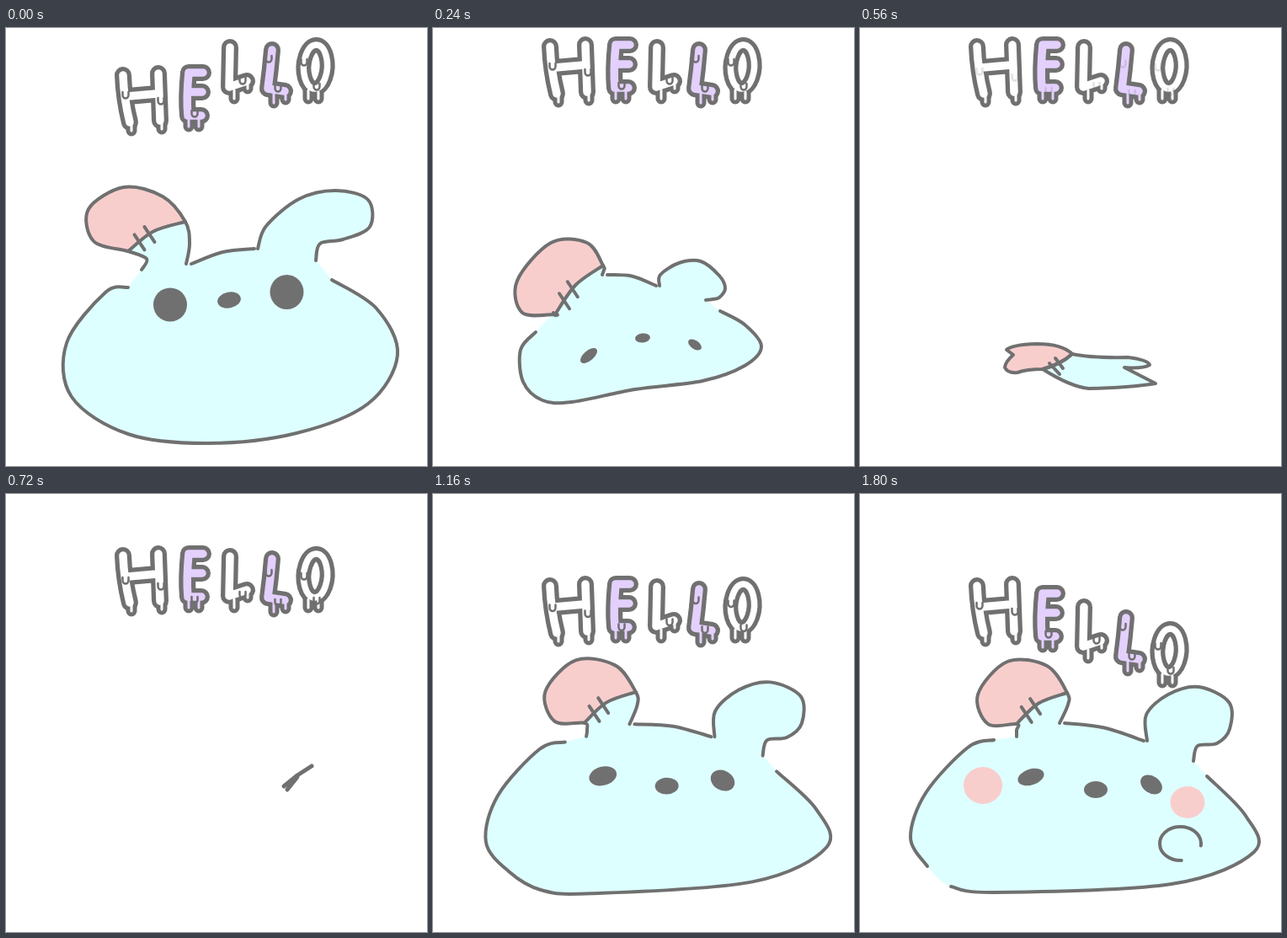
Animation of 500x520 px, one loop 1.84 s. Source, as an HTML page with a canvas:

```html
<!DOCTYPE html>
<html>
<head>
<meta charset="utf-8">
<style>
html, body { margin: 0; width: 100%; height: 100%; overflow: hidden; background: #fff; }
canvas { display: block; }
</style>
</head>
<body>
<canvas id="stage" width="500" height="520"></canvas>
<script>
const ctx = document.getElementById('stage').getContext('2d');
const LOOP = 1840, STEP = 40;
const GRAY = '#707070', BLUE = '#deffff', PINK = '#f8cecd', VIOLET = '#e4d0fd';

const lerp = (a, b, u) => a + (b - a) * u;
const ease = u => u * u * (3 - 2 * u);

// Value at time t between [time, value] keys.
function key(t, ...keys) {
  let [t0, v0] = keys[0];
  for (const [t1, v1] of keys) {
    if (t < t1) return t1 === t0 ? v1 : lerp(v0, v1, (t - t0) / (t1 - t0));
    [t0, v0] = [t1, v1];
  }
  return v0;
}

// Key points of a pose; all poses have the same layout, so they can be blended.
// The features are ellipses: x, y, radii, turn.
const points = text => text.split(' ').map(s => s.split(',').map(Number));
const pose = (body, right, left, features) =>
  ({ body: points(body), right: points(right), left: points(left), features: points(features) });

const greet = pose(
  '145,308 118,314 72,374 78,438 145,482 240,493 345,481 430,446 465,388 440,333 387,299',
  '299,262 309,235 348,203 392,193 430,204 432,236 400,251 373,256 368,276',
  '214,280 218,256 213,230 186,200 140,189 98,215 104,253 145,265 167,274 161,287',
  '195,328.5,20,20,0 333.5,313.5,20,20.5,0 265,323,14,9.5,-.2');
const slump = pose(
  '122,361 104,382 107,420 130,442 165,444 240,429 320,419 370,401 390,378 370,352 341,336',
  '269,306 270,293 292,279 318,277 340,294 347,309 340,320 332,322 324,323',
  '201,293 203,287 202,282 183,255 140,255 100,300 106,338 145,340 145,341 143,338',
  '185,389,12,6,-.7 311,376,9,5,.6 249,368,9,5.5,-.1');
const pop = pose(
  '140,299 104,330 74,388 82,445 125,476 210,486 300,479 400,463 444,415 436,350 392,306',
  '293,263 303,223 334,190 372,181 415,194 426,220 400,244 371,252 369,274',
  '218,256 220,248 218,240 205,214 165,209 128,233 135,261 174,275 175,283 166,290',
  '202,308,16,15.5,0 330,305,14,16,0 262,307,12,9,-.2');
const rest = pose(
  '159,292 128,301 78,355 60,408 80,442 108,466 160,473 370,463 468,425 458,382 412,335',
  '341,293 340,262 366,238 402,229 438,247 439,279 424,296 401,299 396,317',
  '237,272 247,250 246,236 222,204 175,199 140,238 152,273 186,273 186,280 186,288',
  '203,336,16,9.5,-.3 346,345,14,10,.6 280,351,14,10,0');

function blend(a, b, u) {
  const p = {};
  for (const part in a)
    p[part] = a[part].map((nums, i) => nums.map((v, j) => lerp(v, b[part][i][j], u)));
  return p;
}

// Smooth curves through runs of points, joined by straight lines.
function curve(...runs) {
  const path = new Path2D();
  for (const pts of runs) {
    const at = i => pts[Math.max(0, Math.min(pts.length - 1, i))];
    path.lineTo(...pts[0]);
    for (let i = 0; i < pts.length - 1; i++) {
      const a = at(i - 1), b = at(i), c = at(i + 1), d = at(i + 2);
      path.bezierCurveTo(b[0] + (c[0] - a[0]) / 6, b[1] + (c[1] - a[1]) / 6,
        c[0] - (d[0] - b[0]) / 6, c[1] - (d[1] - b[1]) / 6, ...c);
    }
  }
  return path;
}

// Three points: from a to b with the middle pushed by (dx, dy).
const bow = (a, b, dx, dy) => [a, [(a[0] + b[0]) / 2 + dx, (a[1] + b[1]) / 2 + dy], b];
const back = pts => [...pts].reverse();

function fill(path, color) {
  ctx.fillStyle = color;
  ctx.fill(path);
}
function stroke(path, width = 4, color = GRAY) {
  ctx.lineWidth = width;
  ctx.strokeStyle = color;
  ctx.stroke(path);
}
function oval(x, y, rx, ry, turn, color) {
  const path = new Path2D();
  path.ellipse(x, y, rx, ry, turn, 0, 2 * Math.PI);
  fill(path, color);
}

function bunny({ body, right, left, features }, gap) {
  const head = bow([left[0][0] + 6, left[0][1]], [right[0][0] - 4, right[0][1]], 0, -5);
  const patch = left.slice(2, 8);
  const seam = bow(patch[5], patch[0], -4, -6);
  fill(curve(body, back(right), back(head), left), BLUE);
  fill(curve(patch, seam), PINK);

  const outline = gap ? [body.slice(0, 5), body.slice(5)] : [body];
  for (const line of [...outline, head, right, left, seam]) stroke(curve(line));
  for (const u of [0.45, 0.85]) {
    const x = lerp(seam[0][0], seam[1][0], u), y = lerp(seam[0][1], seam[1][1], u);
    stroke(curve([[x - 6, y - 9], [x + 6, y + 9]]));
  }
  for (const f of features) oval(...f, GRAY);
}

function paw(t) {
  const u = (1 - Math.cos((t - 1440) / 240 * 2 * Math.PI)) / 2;
  const path = new Path2D(), rad = Math.PI / 180;
  path.ellipse(lerp(408, 380.5, u), lerp(412, 415, u), 24.5, lerp(24, 20, u), 0,
    lerp(170, 87, u) * rad, lerp(425, 367, u) * rad);
  stroke(path);
}

// Draw with the point (px, py) moved to (x, y), scaled and turned.
function place(px, py, x, y, sx, sy, turn, draw) {
  ctx.save();
  ctx.translate(x, y);
  ctx.rotate(turn);
  ctx.scale(sx, sy);
  ctx.translate(-px, -py);
  draw();
  ctx.restore();
}

const RAG_BLUE = new Path2D('M217 405Q238 400 252 387Q275 392 318 391Q342 394 344 400Q335 405 314 403L351 422Q320 427 272 428Q250 426 217 405Z');
const RAG_PINK = new Path2D('M217 405Q240 398 252 387Q240 375 210 375Q180 376 174 382L182 388Q172 397 172 403Q175 410 187 409Q198 405 217 405Z');
const RAG_STITCH = new Path2D('M225 398L237 411M232 392L241 404');
const TWIG = new Path2D('M363 323L346 334L330 347M346 336L334 351');

function rag() {
  fill(RAG_BLUE, BLUE);
  fill(RAG_PINK, PINK);
  for (const path of [RAG_BLUE, RAG_PINK, RAG_STITCH]) stroke(path);
}

function character(t) {
  if (t < 480) {
    const u = ease(key(t, [40, 0], [240, 1]));
    const dy = key(t, [0, 0], [80, 22], [240, 0]);
    const sx = key(t, [240, 1], [480, 0.65]), sy = key(t, [240, 1], [480, 0.35]);
    place(255, 400, 255, 400 + dy, sx, sy, 0, () => bunny(blend(greet, slump, u)));
  } else if (t < 700) {
    const u = key(t, [560, 0], [720, 1]), s = lerp(1, 0.2, u);
    place(262, 401, lerp(262, 347, u), lerp(401, 337, u), s, s, -0.65 * u, rag);
  } else if (t < 760) {
    stroke(TWIG, 5);
  } else if (t < 920) {
    const s = Math.sin((t - 720) / 200 * Math.PI / 2);
    place(260, 370, lerp(347, 260, s), lerp(337, 370, s), s, s, 0, () => bunny(pop));
  } else if (t < 1040) {
    bunny(blend(pop, greet, ease((t - 920) / 120)));
  } else {
    const u = ease(key(t, [1040, 0], [1200, 1]));
    bunny(blend(greet, rest, u), u > 0.9);
    if (t >= 1240) {
      oval(146, 346, 23, 22, 0, PINK);
      oval(389, 366, 20.5, 19, 0, PINK);
    }
    if (t >= 1280) paw(t);
  }
}

// Letters are thick skeleton lines with thin tips hanging below;
// marks are the small drops on their faces.
const LETTERS = [
  { bones: 'M139 22Q140 50 147 78M181 20L183 76M145 47L179 44', tips: 'M149 78V88M185 74V86',
    marks: [[142, 47], [184, 54]], start: 34, end: 0 },
  { bones: 'M234 20H217Q214 50 216 71H232M218 43H233', tips: 'M217 74V84M229 74V84', color: VIOLET,
    marks: [[224, 70]], start: 33, end: 11 },
  { bones: 'M266 23L265 70L286 63', tips: 'M271 74V84M287 64V72',
    marks: [[281, 64]], start: 0, end: 24 },
  { bones: 'M316 26Q314 50 311 72L331 75', tips: 'M318 76V89M332 76V85', color: VIOLET,
    marks: [[312, 38], [323, 73]], start: 0, end: 34 },
  { bones: 'M368 20A14 26 3 1 0 369 20Z', tips: 'M359 74V84M371 76V84', width: 18,
    marks: [[354, 42], [369, 71]], start: 0, end: 53 }
].map(l => ({ ...l, bones: new Path2D(l.bones), tips: new Path2D(l.tips) }));
const MARK = new Path2D('M-3.5 -5v3.5a3.5 4 0 0 0 7 0v-3.5');

function letters(t) {
  const drop = key(t, [560, 0], [720, 51], [920, 81], [1120, 87]);
  const lift = key(t, [0, 1], [160, 0]), sag = key(t, [1480, 0], [1680, 1]);
  const slide = key(t, [280, 0], [480, 6], [1000, 6], [1280, 0]);
  const alpha = key(t, [400, 1], [560, 0.2], [600, 0.2], [680, 1]);
  for (const { bones, tips, width = 20, color = '#fff', marks, start, end } of LETTERS) {
    ctx.save();
    ctx.translate(0, drop + start * lift + end * sag);
    stroke(bones, width);
    stroke(tips, 13);
    stroke(bones, width - 10.5, color);
    stroke(tips, 3, color);
    ctx.globalAlpha = alpha;
    for (const [x, y] of marks) place(0, 0, x, y + slide, 1, 1, 0, () => stroke(MARK, 2.5));
    ctx.restore();
  }
}

function frame(now) {
  const t = Math.floor(now % LOOP / STEP) * STEP;
  ctx.fillStyle = '#fff';
  ctx.fillRect(0, 0, 500, 520);
  character(t);
  letters(t);
  requestAnimationFrame(frame);
}
ctx.lineCap = ctx.lineJoin = 'round';
requestAnimationFrame(frame);
</script>
</body>
</html>
```
